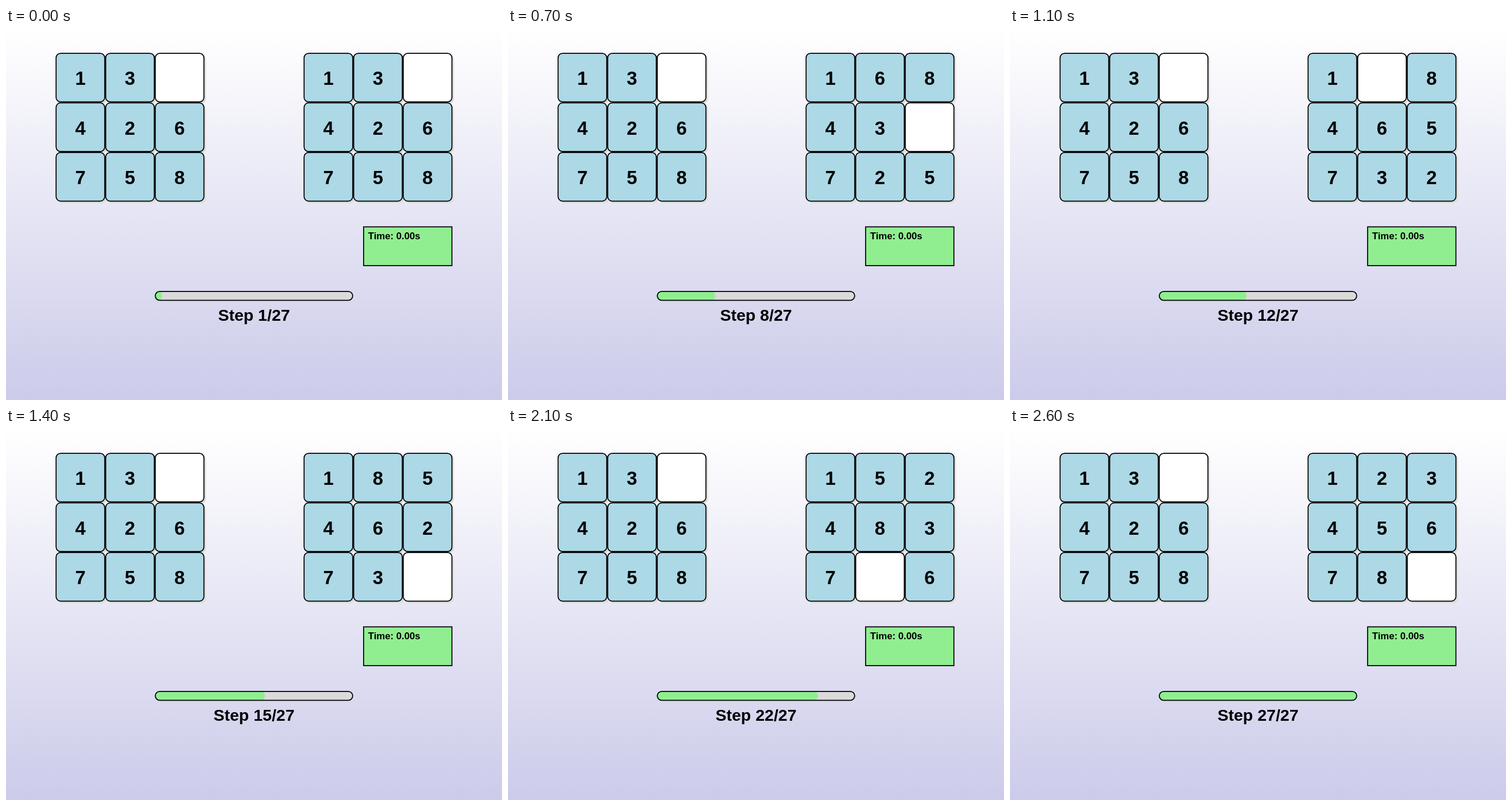
An HTML page with a canvas for the animation above (2.7 s loop, 864 px wide and 648 px high).

```html
<!DOCTYPE html>
<html lang="en">
<head>
<meta charset="utf-8">
<title>Sliding puzzle</title>
<style>
  html, body { margin: 0; height: 100%; overflow: hidden; }
  canvas { display: block; }
</style>
</head>
<body>
<canvas width="864" height="648"></canvas>
<script>
const ctx = document.querySelector('canvas').getContext('2d');
const STEPS = 27, STEP_MS = 100, TILE = 100;
const START = [1, 3, 0, 4, 2, 6, 7, 5, 8];
const BLANK_LOOP = [2, 5, 8, 7, 4, 1];   // the gap circles the two right columns

// Layout uses a 1000 x 750 grid.
ctx.scale(0.864, 0.864);
const sky = ctx.createLinearGradient(0, 0, 0, 750);
sky.addColorStop(0, '#fff');
sky.addColorStop(1, '#cccbea');

function boardAt(step) {
  const board = [...START];
  for (let i = 1; i <= step; i++) {
    const from = BLANK_LOOP[(i - 1) % 6], to = BLANK_LOOP[i % 6];
    board[from] = board[to];
    board[to] = 0;
  }
  return board;
}

function box(x, y, w, h, radius, fill, outlined = true) {
  const inset = outlined ? 1 : 0;
  ctx.beginPath();
  ctx.roundRect(x + inset, y + inset, w - 2 * inset, h - 2 * inset, Math.max(0, radius - inset));
  if (fill) {
    ctx.fillStyle = fill;
    ctx.fill();
  }
  if (outlined) {
    ctx.strokeStyle = '#000';
    ctx.lineWidth = 2;
    ctx.stroke();
  }
}

function label(text, x, y, size, align = 'center') {
  ctx.font = `bold ${size}px "Liberation Sans", Arial, sans-serif`;
  ctx.textAlign = align;
  ctx.fillStyle = '#000';
  ctx.fillText(text, x, y);
}

function drawBoard(board, left, top) {
  board.forEach((value, i) => {
    const x = left + i % 3 * TILE, y = top + Math.floor(i / 3) * TILE;
    box(x + 3, y + 3, TILE, TILE, 10, '#dcdcd8', false);
    box(x, y, TILE, TILE, 10, value ? '#add8e6' : '#fff');
    if (value) label(value, x + 50, y + 65, 38);
  });
}

function draw(now) {
  const step = Math.floor(now / STEP_MS) % STEPS;
  ctx.fillStyle = sky;
  ctx.fillRect(0, 0, 1000, 750);

  drawBoard(START, 100, 50);
  drawBoard(boardAt(step), 600, 50);

  box(720, 400, 180, 80, 0, '#90ee90');
  label('Time: 0.00s', 730, 426, 19.4, 'left');

  const filled = Math.floor(400 * (step + 1) / STEPS);
  box(300, 530, 400, 20, 10, '#dadada', false);
  box(300, 530, filled, 20, Math.min(10, filled / 2), '#90ee90', false);
  box(300, 530, 400, 20, 10);
  label(`Step ${step + 1}/${STEPS}`, 500, 590, 33);

  requestAnimationFrame(draw);
}
requestAnimationFrame(draw);
</script>
</body>
</html>
```
